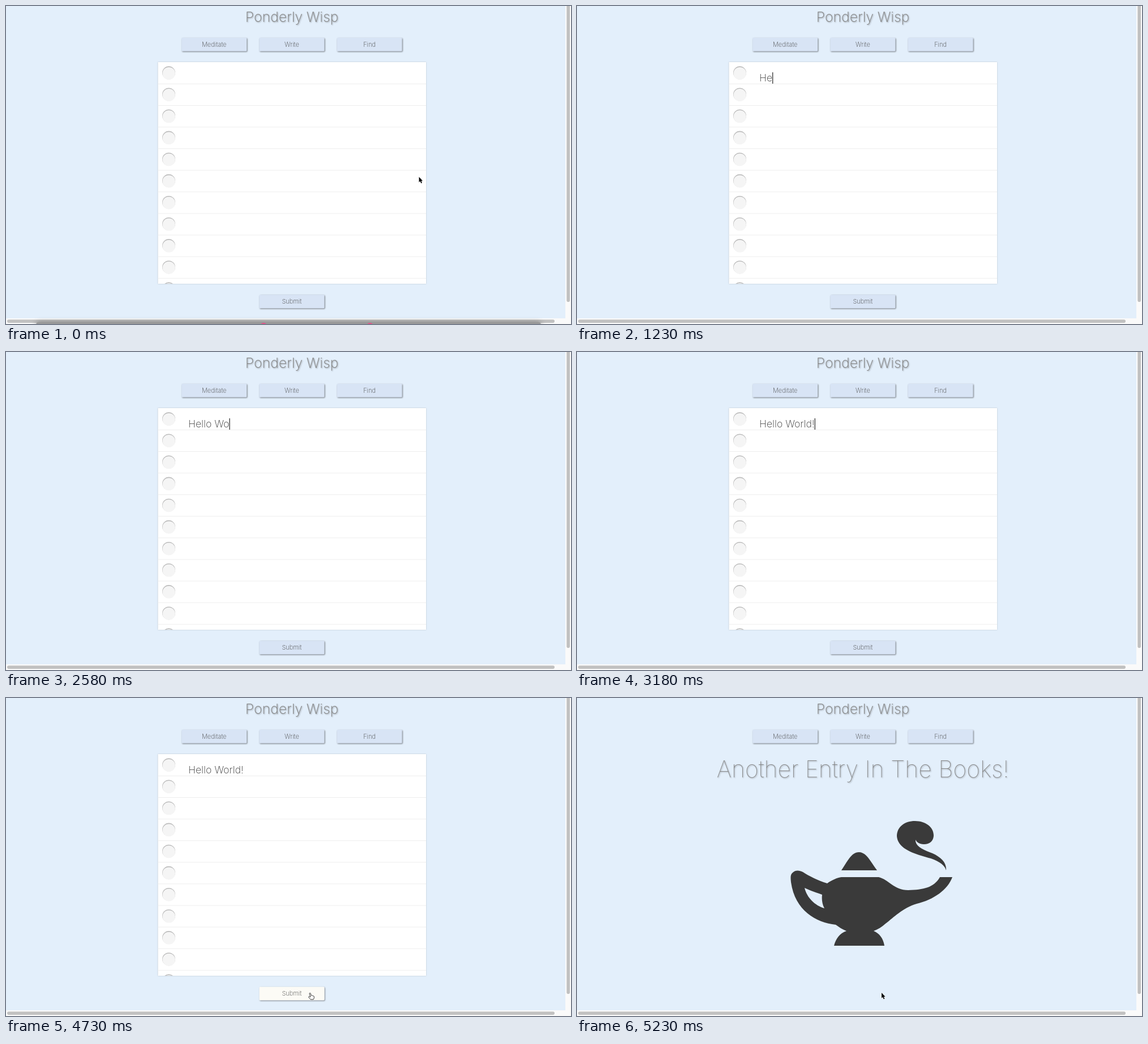
These frames come from a looping animation (998x561 px, 5.73 s). An HTML page:

```html
<!DOCTYPE html>
<html lang="en">
<head>
<meta charset="utf-8">
<title>Journal entry</title>
<style>
  html, body { margin: 0; width: 100%; height: 100%; overflow: hidden; background: #e3effb; }
  svg { display: block; width: 100%; height: 100%; }
  text { font-family: Inter, "Open Sans", sans-serif; font-weight: 200; fill: #333; white-space: pre; }
  .middle { text-anchor: middle; }
  .heading { fill: #808080; filter: drop-shadow(1.8px 1.8px 1.3px rgba(0, 0, 0, .35)); }
  .label { font-size: 11px; fill: #444; }
  .button { fill: #d8e4f5; filter: drop-shadow(1.8px 1.8px 1.3px rgba(0, 0, 0, .5)); }
  .paper { fill: #fff; filter: drop-shadow(0 0 1px rgba(0, 0, 0, .2)); }
  .dock { filter: drop-shadow(0 0 5px rgba(0, 0, 0, .35)); }
</style>
</head>
<body>
<svg viewBox="0 0 998 561">
  <defs>
    <clipPath id="paperClip"><rect x="268.5" y="99" width="473.5" height="391"/></clipPath>
  </defs>
  <rect width="998" height="561" fill="#e3effb"/>

  <text class="middle heading" x="505" y="28" font-size="24.8">Ponderly Wisp</text>
  <g id="menu"></g>

  <g id="editor">
    <rect class="paper" x="268.5" y="99" width="473.5" height="391"/>
    <g id="rows" clip-path="url(#paperClip)"></g>
    <text id="entry" x="322" y="133" font-size="17.6"></text>
    <rect id="caret" y="117" width="1.2" height="20" fill="#222"/>
    <g id="submit"></g>
  </g>

  <text id="done" class="middle heading" x="505" y="140" font-size="41" style="font-weight:100">Another Entry In The Books!</text>
  <g id="lamp" fill="#3a3a3a" fill-rule="evenodd">
    <path d="M467 304C477 290 484 272 498 272S519 290 530 304Z"/>
    <path d="M467 316H533C550 320 560 339 585 339C612 338 630 335 641 316H663C655 338 630 356 600 363C574 371 560 387 545 398C538 404 532 408 524 411C534 415 541 424 543 437H454C457 425 464 415 476 411C468 408 463 404 457 400C422 396 385 375 378 325C377 316 377 311 381 308C386 303 393 304 399 307C410 314 425 322 442 327C450 321 460 317 467 316Z
             M402 335C412 340 425 344 433 347C432 355 433 364 437 371C420 366 406 352 402 335Z"/>
    <path d="M652 304C650 296 642 289 625 283C600 276 567 268 565 244C565 227 579 217 597 217C616 217 630 228 630 242C630 252 623 258 613 258C606 258 600 255 598 250C597 262 612 268 628 274C643 281 653 290 652 304Z"/>
  </g>

  <path d="M988 0H998V561H0V551H988Z" fill="#fafafa"/>
  <rect x="990.3" y="-9" width="5.7" height="531" rx="2.8" fill="#c1c1c1"/>
  <rect x="2" y="553.2" width="967" height="5.7" rx="2.8" fill="#c1c1c1"/>
  <g id="dock" class="dock">
    <rect x="52" y="557.5" width="894" height="30" rx="7" fill="#999"/>
    <circle cx="455" cy="566" r="7" fill="#e8508a"/>
    <circle cx="643" cy="566" r="7" fill="#e8508a"/>
  </g>

  <g id="cursor">
    <path id="arrow" d="M0 0V9.5L2.1 7.6 3.7 11.3 5.4 10.6 3.8 7H6.5Z" stroke="#fff" stroke-width=".8" paint-order="stroke"/>
    <path id="beam" d="M-2.5-5.5Q0-5.5 0-4V4Q0 5.5-2.5 5.5M2.5-5.5Q0-5.5 0-4M0 4Q0 5.5 2.5 5.5M-1.5 1.5H1.5" fill="none" stroke="#333"/>
    <path id="hand" d="M-1.2 1.5L-3-4.2Q-3.2-5.6-2-5.6Q-1.2-5.6-.9-4.6L0-1.2Q1.5-2 2.2-.9Q3.5-1.4 4-.2Q5-.2 5.2 1Q5.6 4 4 5.8H-1L-4.3 2Q-5 .8-3.6.6Q-2.5.6-1.2 1.5Z" fill="#fff" stroke="#222" stroke-width=".9"/>
  </g>
</svg>
<script>
const LOOP = 5730, TICK = 50, FIRST_TICK = 30;
const MESSAGE = "Hello World!";
const KEY_TIMES = [980, 1230, 1380, 1530, 1680, 1780, 2430, 2580, 2730, 2930, 3030, 3180];
const CARET_ON = [[230, 480], [980, 1880], [2430, 3680], [4180, 4680]];
// time, x, y
const POINTER = [
  [0, 729.5, 301.5], [180, 605, 112], [280, 543, 153], [780, 543, 153], [830, 543.3, 153.2],
  [3830, 540, 246], [4030, 465, 476], [4130, 465, 476], [4380, 539, 526],
  [5180, 539, 526], [5230, 538, 520]
];

const $ = id => document.getElementById(id);
const show = (id, on) => $(id).setAttribute("display", on ? "inline" : "none");
const ramp = (t, from, to) => Math.min(1, Math.max(0, (t - from) / (to - from)));
const within = (t, [from, to]) => t >= from && t < to;

const button = (label, x, y, extra = "") =>
  `<rect class="button" x="${x}" y="${y}" width="115" height="23.7" rx="1.5"/>${extra}
   <text class="middle label" x="${x + 57.5}" y="${y + 15.6}">${label}</text>`;

$("menu").innerHTML = ["Meditate", "Write", "Find"]
  .map((label, i) => button(label, 310.2 + i * 137.2, 56)).join("");
$("submit").innerHTML = button("Submit", 447.4, 509.5,
  '<rect id="hover" x="447.4" y="509.5" width="115" height="23.7" rx="1.5" fill="#fcfbf6"/>');
$("rows").innerHTML = Array.from({ length: 11 }, (_, i) => {
  const y = 118 + i * 38.1;
  return `<circle cx="287.5" cy="${y - .2}" r="11.5" fill="#bcbcbc"/>
    <ellipse cx="287.7" cy="${y + .9}" rx="11.2" ry="11" fill="#f5f5f5"/>
    <path d="M268 ${y + 19.4}H742" stroke="#eee"/>`;
}).join("");

function pointerAt(t) {
  const next = POINTER.findIndex(p => p[0] > t);
  if (next < 0) return POINTER.at(-1).slice(1);
  const [t0, x0, y0] = POINTER[next - 1], [t1, x1, y1] = POINTER[next];
  const k = ramp(t, t0, t1);
  return [x0 + (x1 - x0) * k, y0 + (y1 - y0) * k];
}

function cursorShape(t, y) {
  if (t < FIRST_TICK || t >= 5230) return "arrow";
  if (y < 490) return "beam";
  return y < 509 ? "arrow" : "hand";
}

function draw(time) {
  const t = time < FIRST_TICK ? 0 : FIRST_TICK + TICK * Math.floor((time - FIRST_TICK) / TICK);

  show("editor", t < 5130);
  show("done", t >= 5130);
  show("lamp", t >= 5230);

  $("entry").textContent = MESSAGE.slice(0, KEY_TIMES.filter(k => k <= t).length);
  if (t < 5130) $("caret").setAttribute("x", 322 + $("entry").getComputedTextLength());
  show("caret", CARET_ON.some(span => within(t, span)));
  $("hover").setAttribute("opacity", ramp(t, 4280, 4730));

  show("dock", t < 280);
  $("dock").setAttribute("transform", `translate(0 ${20 * ramp(t, 0, 280)})`);

  const [x, y] = pointerAt(t), shape = cursorShape(t, y);
  $("cursor").setAttribute("transform", `translate(${x} ${y})`);
  show("cursor", !within(t, [980, 3830]));
  for (const id of ["arrow", "beam", "hand"]) show(id, id === shape);
}

const start = performance.now();
function loop() {
  draw((performance.now() - start) % LOOP);
  requestAnimationFrame(loop);
}
loop();
</script>
</body>
</html>
```
